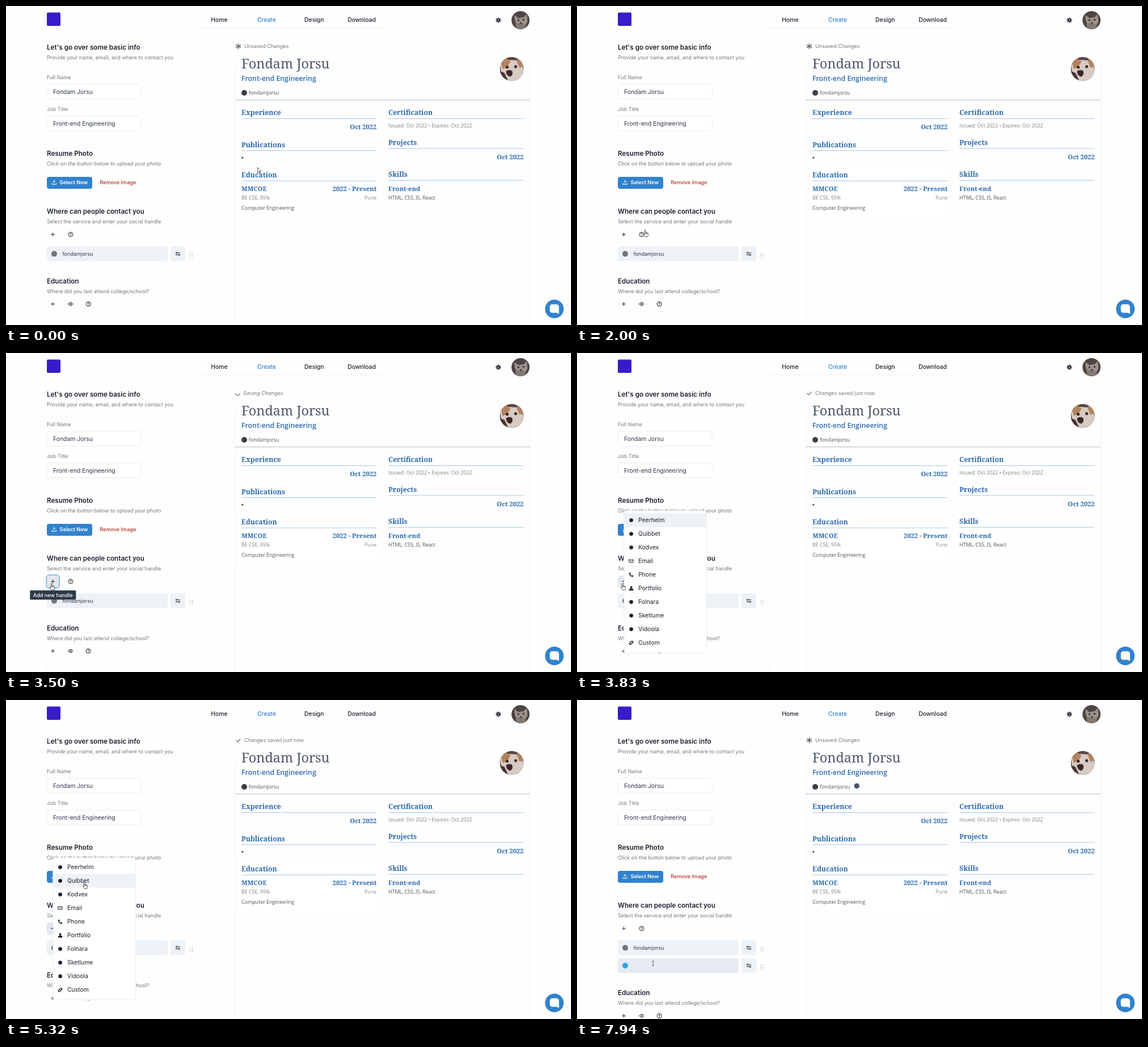
Recreate the animation shown at these times as an HTML page. Size 996 by 562 pixels, loop 8 s.

```html
<!DOCTYPE html>
<html lang="en">
<head>
<meta charset="utf-8">
<title>Resume editor</title>
<style>
html, body { margin: 0; width: 100%; height: 100%; overflow: hidden; background: #fefefe; }
svg { display: block; width: 996px; height: 562px; }
text { font-family: Inter, sans-serif; white-space: pre; }
.serif { font-family: "Noto Serif", serif; }
.sans { font-family: "Open Sans", sans-serif; }
.line { fill: none; stroke: #1a202c; stroke-linecap: round; stroke-linejoin: round; }
</style>
</head>
<body>
<svg id="stage" viewBox="0 0 996 562"></svg>
<script>
const LOOP = 8000;
const INK = '#1a202c', GRAY = '#74787f', BLUE = '#2b69ac', SLATE = '#4a5568';
const NAME = 'Fondam Jorsu', HANDLE = 'fondamjorsu';
const SM = 9.1, MD = 10.375, LG = 11.67;

// y is the middle of the capitals
const text = (x, y, s, size, fill, o = {}) =>
  `<text x="${x}" y="${y + size * .36}" font-size="${size}" fill="${fill}" font-weight="${o.w || 400}"
    text-anchor="${o.a || 'start'}" font-style="${o.i ? 'italic' : 'normal'}" class="${o.c || ''}">${s}</text>`;
const rect = (x, y, w, h, r, fill, more = '') =>
  `<rect x="${x}" y="${y}" width="${w}" height="${h}" rx="${r}" fill="${fill}" ${more}/>`;
const dot = (x, y, r, fill, more = '') => `<circle cx="${x}" cy="${y}" r="${r}" fill="${fill}" ${more}/>`;
const path = (d, more = '') => `<path d="${d}" ${more}/>`;
const line = (d, w = 1, color = INK) => `<path class="line" d="${d}" style="stroke:${color};stroke-width:${w}"/>`;
const group = (id, body) => `<g id="${id}">${body}</g>`;
const at = (x, y, body) => `<g transform="translate(${x} ${y})">${body}</g>`;
const spokes = (n, r0, r1) => Array.from({ length: n }, (_, i) => {
  const a = i / n * 2 * Math.PI, c = Math.sin(a), s = Math.cos(a);
  return `M${c * r0} ${s * r0}L${c * r1} ${s * r1}`;
}).join('');

const plus = (x, y, id = '') => at(x, y, `<path ${id && `id="${id}"`} class="line" d="M-2.8 0H2.8M0-2.8V2.8"/>`);
const help = (x, y) => at(x, y,
  dot(0, 0, 4, 'none', `stroke="${INK}"`) + line('M-1.3-.8A1.3 1.3 0 1 1 .4.4Q0 .6 0 1', .9) + dot(0, 2.2, .55, INK));
const eye = (x, y) => at(x, y, line('M-4.4 0Q0-5.8 4.4 0 0 5.8-4.4 0Z', .9) + dot(0, 0, 1.4, 'none', `stroke="${INK}" stroke-width=".9"`));

const heading = (y, title, sub) =>
  text(72, y, title, LG, INK, { w: 600 }) + text(72, y + 17.8, sub, SM, GRAY);
const input = (y, label, value) =>
  text(72, y - 25, label, SM, GRAY) +
  rect(72.3, y - 13, 166, 26, 4, '#fff', 'stroke="#e2e8f0" stroke-width=".8"') +
  text(83, y, value, MD, '#2d3748');

const knob = (x, y) => dot(x, y, 1.3, '#edf2f7', `stroke="${INK}"`);
const handleRow = (y, color, value, id) =>
  rect(72, y - 13, 213, 26, 4, '#edf2f7', `id="${id}"`) + dot(85, y, 5, color) +
  text(99.5, y, value, SM, '#2d3748') +
  rect(290, y - 13, 26, 26, 4, '#edf2f7') +
  at(303, y, line('M-1-1.8H3.6M-3.6 1.8H1') + knob(-2.3, -1.8) + knob(2.3, 1.8)) +
  [0, 1, 2, 3, 4, 5].map(i => dot(324.6 + i % 2 * 3.8, y - .8 + (i >> 1) * 3.6, .85, '#b4b8bd')).join('');

const section = (x, y, title) =>
  text(x, y, title, 12.2, BLUE, { w: 600, c: 'serif' }) + rect(x, y + 10.1, 238.5, .9, 0, '#9dbfe0');
const strong = (x, y, s, a) => text(x, y, s, 11.2, BLUE, { w: 600, c: 'serif', a });
const small = (x, y, s, fill = '#4a5058', a) => text(x, y, s, 8.87, fill, { c: 'sans', a });
const photo = (x, y, k, back, body) =>
  at(x, y, `<g clip-path="url(#round)" transform="scale(${k})">${rect(-21, -21, 42, 42, 0, back)}<g filter="url(#soft)">${body}</g></g>`);

const header =
  rect(72, 11.5, 24, 23.5, 2, '#3a1bc9') +
  [['Home', 376], ['Create', 459.5], ['Design', 543.3], ['Download', 627]].map(([s, x], i) =>
    text(x, 24.5, s, MD, i === 1 ? '#3182ce' : INK, { w: 500, a: 'middle' })).join('') +
  rect(323, 38, 357, 1, 0, 'url(#fade)') +
  at(868, 25, line(spokes(8, 2.6, 4.4), 1.3) + dot(0, 0, 2.3, '#8d9197', `stroke="${INK}" stroke-width="1.5"`)) +
  photo(907, 25, .76, '#4d4543',
    path('M-14-12L-5-5 7-7 15-14 16 4Q9 17-2 15-15 9-14-12Z', 'fill="#9a918a"') +
    path('M-12 9Q2 4 13 12L9 21H-9Z', 'fill="#817972"') + dot(-5, 0, 2.2, '#383331') + dot(7, -1, 2.2, '#383331') +
    dot(1, 7, 2.6, '#5b4a48'));

const form =
  heading(73, "Let's go over some basic info", 'Provide your name, email, and where to contact you') +
  input(151, 'Full Name', NAME) + input(206.8, 'Job Title', 'Front-end Engineering') +
  heading(260, 'Resume Photo', 'Click on the button below to upload your photo') +
  rect(72, 301, 80, 21, 4, '#3182ce') + rect(72, 301, 80, 21, 4, '#2b6cb0', 'id="press"') +
  at(84.8, 311, line('M0 1.6V-3.4M-2-1.6L0-3.6 2-1.6M-3.6 1.2V3.4H3.6V1.2', .95, '#fff')) +
  text(94.5, 311, 'Select New', SM, '#fff', { w: 600 }) +
  text(165.3, 311, 'Remove Image', SM, '#b83226', { w: 500 }) +
  heading(362, 'Where can people contact you', 'Select the service and enter your social handle') +
  rect(72, 392, 21, 21, 4, '#e2e8f0', 'id="plusBg"') +
  rect(71.2, 391.2, 22.8, 22.8, 4.5, 'none', 'id="ring" stroke="#7fb8e6" stroke-width="1.8"') +
  plus(82.5, 402.5, 'plusMark') + help(114, 402.5) +
  handleRow(436.6, '#6f747b', HANDLE, 'row1') +
  group('added', handleRow(468, '#29a9e0', '', 'row2')) +
  group('below', heading(484.6, 'Education', 'Where did you last attend college/school?') +
    plus(82.5, 525) + eye(114, 525) + help(145.2, 525) +
    rect(71.6, 552, .8, 12, 0, '#eeeff1') + rect(338, 552, .8, 12, 0, '#eeeff1'));

const resume =
  group('unsaved', at(409.5, 71, line(spokes(6, 0, 4.5), 1.6, '#686c72')) + text(420, 71, 'Unsaved Changes', SM, GRAY)) +
  group('saving', at(408.5, 71, group('spin', line('M-3.7 0A3.7 3.7 0 0 0 3.7 0', 1.1, '#5d6168'))) +
    text(418, 71, 'Saving Changes', SM, GRAY, { i: 1 })) +
  group('saved', line('M406 71.2L408.6 73.6 413 68.6', 1.2, '#5d6168') + text(420, 71, 'Changes saved just now', SM, GRAY)) +
  rect(403.6, 84, .9, 480, 0, 'url(#edge)') + rect(923, 84, .9, 480, 0, 'url(#edge)') +
  rect(411, 284, 245, 88, 0, '#fff', 'id="touched"') +
  text(415, 101.5, NAME, 23.4, SLATE, { c: 'serif' }) +
  text(415, 128, 'Front-end Engineering', 12.3, BLUE, { w: 600, c: 'sans' }) +
  dot(420, 153, 5, '#3c4149') + small(428, 152.7, HANDLE) +
  group('link', dot(493.2, 151.4, 4.7, SLATE)) +
  rect(404, 165, 519, 1, 0, '#b7babf') +
  photo(891.5, 110.8, 1, '#5a4546',
    path('M-21-9L-8-16 8-15 18-21 21 8Q10 24-8 21L-18 10Z', 'fill="#d6cac3"') +
    path('M-19-12L-12-20-2-13-8-3-16 0Z', 'fill="#b3835c"') + path('M8-15L17-20 20-4 14-2Z', 'fill="#b08260"') +
    path('M-21 4L-13 7-6 21H-21Z', 'fill="#493638"') + dot(-8, -3, 2.6, '#35282a') + dot(7, -4, 2.6, '#35282a') +
    path('M-10 4Q-3 0 1 4 3 11-3 14-10 12-10 4Z', 'fill="#3d2729"')) +
  section(415, 187.8, 'Experience') + strong(653.3, 212.6, 'Oct 2022', 'end') +
  section(415, 244.2, 'Publications') + dot(416.8, 267.3, 1.5, '#3c4149') +
  section(415, 297.5, 'Education') + strong(415, 322.3, 'MMCOE') + strong(653.3, 322.3, '2022 - Present', 'end') +
  small(415, 337.4, 'BE CSE, 95%', '#7b8087') + small(653.3, 337.4, 'Pune', '#8a8f96', 'end') +
  small(415, 356.3, 'Computer Engineering') +
  section(674, 187.8, 'Certification') + small(674, 210.4, 'Issued: Oct 2022 • Expires: Oct 2022', '#7b8087') +
  section(674, 240.4, 'Projects') + strong(912.5, 265.6, 'Oct 2022', 'end') +
  section(674, 296.6, 'Skills') + strong(674, 322, 'Front-end') + small(674, 337.4, 'HTML, CSS, JS, React');

const chat = dot(966.7, 533.7, 16.4, '#3182ce') +
  path('M963.4 525.4H969.8Q974.8 525.4 974.8 530.4V542.6L970.6 540.4H963.4Q958.6 540.4 958.6 535.4V530.4Q958.6 525.4 963.4 525.4Z', 'fill="#fff"');

const ITEM = 24, MENU_TOP = 282.6;
const items = ['Peerhelm', 'Quibbet', 'Kodvex', 'Email', 'Phone', 'Portfolio', 'Folnara', 'Sketlume', 'Vidoola', 'Custom'];
const icons = {
  Email: line('M-3.5-2.6H3.5V2.6H-3.5ZM-3.4-2.2L0 .6 3.4-2.2', .9),
  Phone: path('M-3.8-3L-1.7-3.8-.7-1.4-1.8-.5Q-1.1 1.1.5 1.8L1.4.7 3.8 1.7 3 3.8Q-3.6 3.6-3.8-3Z', `fill="${INK}"`),
  Portfolio: dot(0, -1.8, 2, INK) + path('M-3.9 3.8Q-3.9.4-1.8.4H1.8Q3.9.4 3.9 3.8Z', `fill="${INK}"`),
  Custom: `<g transform="rotate(-45)">${line('M.6-1.5H-2.2A1.5 1.5 0 0 0-2.2 1.5H.2M-.6 1.5H2.2A1.5 1.5 0 0 0 2.2-1.5H-.2', 1.5)}</g>`
};
const menu = group('menu',
  rect(82.8, 277.5, 145.8, 250.8, 4, '#fff', 'stroke="#e2e8f0" stroke-width=".8"') +
  rect(83.2, MENU_TOP, 145, ITEM, 0, '#edf2f7', 'id="mark"') +
  items.map((s, i) => {
    const y = MENU_TOP + ITEM * (i + .5);
    return at(95.6, y, icons[s] || dot(0, 0, 3.4, INK)) + text(108, y, s, MD, INK);
  }).join(''));

const tip = group('tip', rect(42.3, 418.3, 81, 16.3, 1.4, '#2d3748') +
  text(82.8, 426.4, 'Add new handle', SM, '#fff', { w: 500, a: 'middle' }));

const cursors =
  group('arrow', path('M.4.4V9.7L2.5 7.8 4 11 5.3 10.4 3.9 7.4H6.8Z', 'fill="#fff" stroke="#222" stroke-width=".75"')) +
  group('hand', path('M2.3 1.6A.95.95 0 0 1 4.2 1.6V5.2L7.3 5.9Q8.7 6.2 8.6 7.6L8.2 10.4 7.4 12.5H3.5L.8 8.8Q.2 7.8 1 7.4L2.3 8.3ZM4.2 5.4V7.6M5.7 5.6V7.6M7.1 5.9V7.6',
    'fill="#fff" stroke="#222" stroke-width=".75" stroke-linejoin="round"')) +
  group('beam', line('M-1.6-4.2Q0-4.2 0-3.2 0-4.2 1.6-4.2M0-3.2V3.2M-1.6 4.2Q0 4.2 0 3.2 0 4.2 1.6 4.2', .8, '#444'));

document.getElementById('stage').innerHTML =
  `<defs><clipPath id="round"><circle r="21"/></clipPath><filter id="soft"><feGaussianBlur stdDeviation=".7"/></filter>
  <linearGradient id="fade"><stop stop-color="#f1f2f4" stop-opacity="0"/><stop offset=".06" stop-color="#f1f2f4"/>
  <stop offset=".94" stop-color="#f1f2f4"/><stop offset="1" stop-color="#f1f2f4" stop-opacity="0"/></linearGradient>
  <linearGradient id="edge" x2="0" y2="1"><stop stop-color="#eceef0" stop-opacity="0"/><stop offset=".06" stop-color="#eceef0"/></linearGradient></defs>` +
  header + form + resume + chat + tip + menu + cursors;

const el = {};
document.querySelectorAll('[id]').forEach(e => el[e.id] = e);
const show = (id, on) => el[id].setAttribute('opacity', +on);
const move = (id, x, y) => el[id].setAttribute('transform', `translate(${x} ${y})`);
const scale = (id, k, x, y) => el[id].setAttribute('transform', `translate(${x} ${y}) scale(${k}) translate(${-x} ${-y})`);
const ramp = (t, a, b) => Math.max(0, Math.min(1, (t - a) / (b - a)));
const inOut = u => u * u * (3 - 2 * u), out = u => 1 - (1 - u) ** 2, linear = u => u;

// first step, last step, steps, end x, end y, easing
const moves = [
  [900, 1650, 12, 188, 352, inOut],
  [1720, 2000, 5, 117, 394, linear],
  [2070, 2480, 7, 77, 404, out],
  [2550, 2550, 1, 77, 405, linear],
  [4350, 5130, 12, 134, 319, inOut],
  [5200, 5320, 2, 135, 320, linear],
  [7180, 7940, 12, 131, 464, inOut]
];

function pointer(t) {
  let x = 443, y = 284;
  for (const [t0, t1, n, ex, ey, ease] of moves) {
    if (t < t0) break;
    const i = n > 1 ? Math.floor((t - t0) / (t1 - t0) * (n - 1) + .01) : 0;
    const u = ease(Math.min(1, (i + 1) / n));
    x += (ex - x) * u;
    y += (ey - y) * u;
  }
  return { x, y };
}

// value of the last entry reached in [time, value, ...]
const hold = (t, list) => {
  let v = 0;
  for (let i = 0; i < list.length && list[i] <= t; i += 2) v = list[i + 1];
  return v;
};

function draw(t) {
  const p = pointer(t), hotX = p.x + 3;
  const overGap = t > 2000 && t < 2480 && hotX > 93 && hotX < 103;
  const kind = t < 1925 || overGap ? 'arrow' : t < 7180 || p.y < 322 ? 'hand' : p.y < 424 ? 'arrow' : 'beam';
  for (const id of ['arrow', 'hand', 'beam']) show(id, id === kind);
  move(kind, p.x + (kind === 'beam' ? 3 : 0), p.y);

  const grown = t >= 6240;
  show('touched', t >= 970);
  show('unsaved', t < 3280 || grown);
  show('saving', t >= 3280 && t < 3700);
  show('saved', t >= 3700 && !grown);
  el.spin.setAttribute('transform', `rotate(${Math.floor((t - 3500) / 68) * 55})`);

  show('added', grown);
  show('link', grown);
  move('below', 0, grown ? 31.4 : 0);
  el.row2.setAttribute('fill', t < 6500 ? '#edf2f7' : '#e6ebf2');
  show('press', ramp(t, 6430, 6640) * (1 - ramp(t, 7180, 7380)));

  show('plusBg', ramp(t, 2150, 2350) * (1 - ramp(t, 6440, 6640)));
  show('ring', t >= 3350 && t < 3630);
  el.plusMark.style.stroke = t >= 6500 ? '#24508a' : INK;

  const tipIn = hold(t, [2345, .35, 2415, .8, 2480, 1, 3560, .4, 3630, 0]);
  show('tip', tipIn);
  scale('tip', .85 + .15 * tipIn, 82.8, 418);

  const open = hold(t, [3560, .15, 3630, .55, 3700, .9, 3770, 1, 6310, .5, 6380, .1375, 6440, 0]);
  show('menu', open);
  scale('menu', .8 + .2 * open, 155, t < 5000 ? 403 : 341);
  const row = t >= 4350 && hotX > 83 ? Math.floor((p.y - MENU_TOP) / ITEM) : 0;
  move('mark', 0, Math.max(0, Math.min(items.length - 1, row)) * ITEM);
}

function tick(now) {
  draw(now % LOOP);
  requestAnimationFrame(tick);
}
draw(0);
requestAnimationFrame(tick);
</script>
</body>
</html>
```
